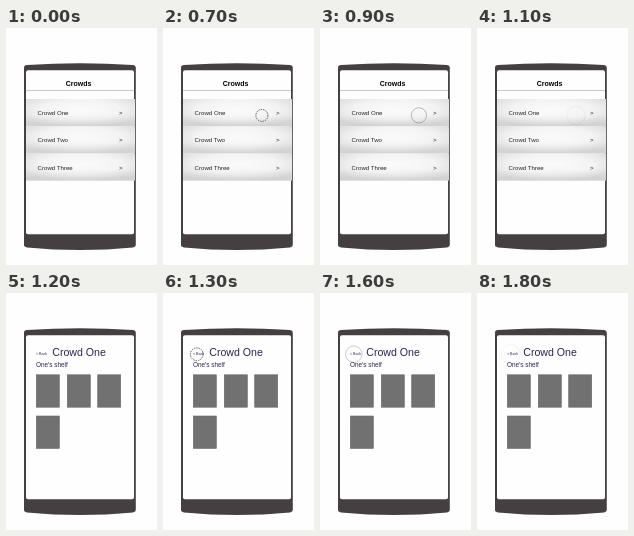
Recreate the animation shown at these times as an HTML page. Size 151 by 237 pixels, loop 1.9 s.

```html
<!DOCTYPE html>
<html lang="en">
<head>
<meta charset="utf-8">
<title>Crowds</title>
<style>
  html, body { margin: 0; width: 100%; height: 100%; overflow: hidden; background: #fefefe; }
  svg { display: block; width: 100vw; height: 100vh; font-family: Arial, "Liberation Sans", sans-serif; }
</style>
</head>
<body>
<svg viewBox="0 0 151 237">
  <defs>
    <radialGradient id="glow" cx=".5" cy=".4" r=".62">
      <stop offset="0" stop-color="#fbfbfb"/>
      <stop offset=".6" stop-color="#f3f3f3"/>
      <stop offset="1" stop-color="#dedede"/>
    </radialGradient>
    <linearGradient id="edge" x2="0" y2="1">
      <stop offset=".6" stop-color="#888" stop-opacity="0"/>
      <stop offset="1" stop-color="#888" stop-opacity=".16"/>
    </linearGradient>
  </defs>

  <path fill="#453f41" d="M18 39.5Q18 37.4 21 37Q74 33.6 127 37Q129.8 37.4 129.8 39.5V217Q129.8 219 127 219.4Q74 224.6 21 219.4Q18 219 18 217Z"/>
  <rect x="20" y="42.3" width="108" height="164" rx="2" fill="#fefefe"/>

  <g id="list">
    <text x="72.5" y="57.6" font-size="7" font-weight="bold" text-anchor="middle">Crowds</text>
    <path d="M20 62.5H128" stroke="#bbb" stroke-width=".8"/>
    <g id="rows" font-size="6.1" fill="#222"></g>
  </g>

  <g id="shelf" fill="#2d2455">
    <text x="30" y="62" font-size="3.6">&lt; Back</text>
    <text x="46.3" y="63" font-size="10.6">Crowd One</text>
    <text x="30" y="74.3" font-size="6.4">One's shelf</text>
    <g fill="#717171" stroke="#666" stroke-width=".6">
      <rect x="30.3" y="81.8" width="23" height="32.4"/>
      <rect x="61.3" y="81.8" width="23" height="32.4"/>
      <rect x="91.7" y="81.8" width="23" height="32.4"/>
      <rect x="30.3" y="123" width="23" height="32.4"/>
    </g>
  </g>

  <circle id="tap" fill="none" stroke="#333"/>
</svg>
<script>
const LOOP = 1900, STEP = 100;
const [list, shelf, rows, tap] = ["list", "shelf", "rows", "tap"].map(id => document.getElementById(id));
const taps = [
  { start: 700, end: 1200, x: 98.9, y: 87.4, grow: [6, 9.2], dotted: 2 },
  { start: 1300, end: 1900, x: 33.8, y: 61.2, grow: [6.4, 9.5], dotted: 3 }
];

rows.innerHTML = ["One", "Two", "Three"].map((name, i) => `
  <g transform="translate(0 ${71 + i * 27.2})">
    <rect x="20" width="109" height="27.2" fill="url(#glow)"/>
    <rect x="20" width="109" height="27.2" fill="url(#edge)"/>
    <text x="31.6" y="16.2">Crowd ${name}</text>
    <text x="113" y="16.2">&gt;</text>
  </g>`).join("");

const show = (el, on) => el.setAttribute("display", on ? "inline" : "none");

function draw(now) {
  const t = Math.floor(now % LOOP / STEP) * STEP;
  show(list, t < 1200);
  show(shelf, t >= 1200);

  const hit = taps.find(p => t >= p.start && t < p.end);
  show(tap, hit);
  if (hit) {
    const step = (t - hit.start) / STEP;
    const k = step / ((hit.end - hit.start) / STEP - 1);
    const dotted = step < hit.dotted;
    tap.setAttribute("cx", hit.x);
    tap.setAttribute("cy", hit.y);
    tap.setAttribute("r", hit.grow[0] + (hit.grow[1] - hit.grow[0]) * k);
    tap.setAttribute("stroke-width", dotted ? .9 : .7);
    tap.setAttribute("stroke-dasharray", dotted ? "1.4 1" : "none");
    tap.setAttribute("stroke-opacity", dotted ? .9 : Math.max(.08, .95 - k));
  }
  requestAnimationFrame(draw);
}
requestAnimationFrame(draw);
</script>
</body>
</html>
```
